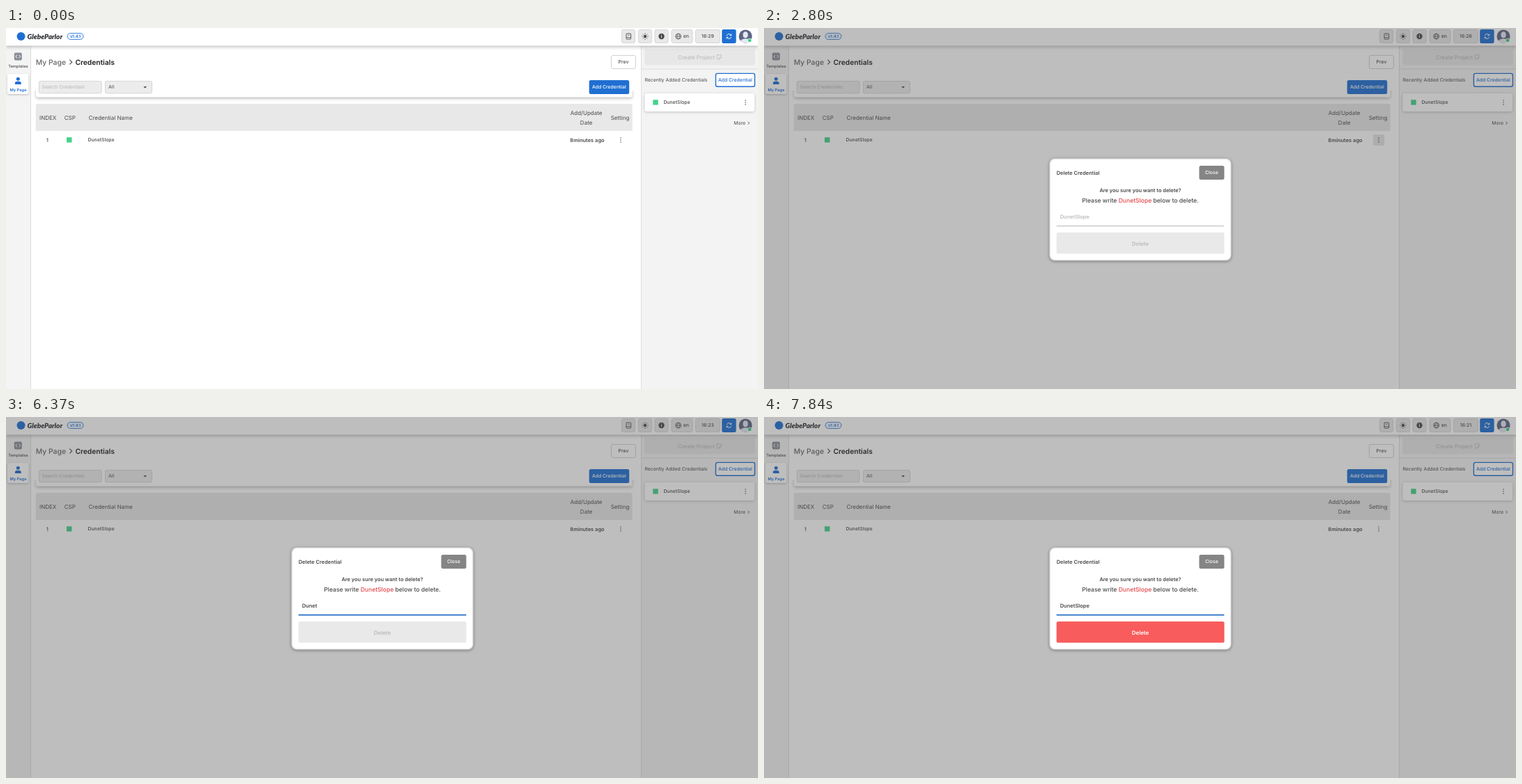
Animation, 1079 px wide and 519 px high, one loop 8 s. Source, as an HTML page with a canvas:

```html
<!DOCTYPE html>
<html lang="en">
<head>
<meta charset="utf-8">
<title>Delete credential</title>
<style>
html, body { margin: 0; width: 100%; height: 100%; overflow: hidden; background: #fff; }
canvas { display: block; width: 1079px; height: 519px; }
</style>
</head>
<body>
<canvas id="stage"></canvas>
<script>
const W = 1079, H = 519, LOOP = 8000;
const STEP = 70, TICK = 1050, FIRST_TICK = 490;
const MENU_OPEN = 2100, MODAL = 2800, FOCUS = 3640;
const KEYS = [4900, 5390, 5530, 5740, 5880, 6580, 6790, 6930, 7070, 7210];
const BRAND = 'GlebeParlor', NAME = 'DunetSlope';
const BLUE = '#1f6fd2', INK = '#4a4a4a', GREEN = '#45d28a';

const canvas = document.getElementById('stage');
const dpr = window.devicePixelRatio || 1;
canvas.width = Math.round(W * dpr);
canvas.height = Math.round(H * dpr);
const c = canvas.getContext('2d');

function box(x, y, w, h, r, fill, stroke, line = 0.8) {
  c.beginPath();
  c.roundRect(x, y, w, h, r);
  if (fill) { c.fillStyle = fill; c.fill(); }
  if (stroke) { c.strokeStyle = stroke; c.lineWidth = line; c.stroke(); }
}

function shadowBox(x, y, w, h, r, fill, color, blur, dy) {
  c.save();
  c.shadowColor = color;
  c.shadowBlur = blur * dpr;
  c.shadowOffsetY = dy * dpr;
  box(x, y, w, h, r, fill);
  c.restore();
}

function disc(x, y, r, fill) {
  c.beginPath();
  c.arc(x, y, r, 0, 7);
  c.fillStyle = fill;
  c.fill();
}

function path(points, color, width) {
  c.beginPath();
  points.forEach(([x, y], i) => i ? c.lineTo(x, y) : c.moveTo(x, y));
  c.strokeStyle = color;
  c.lineWidth = width;
  c.stroke();
}

function arc(x, y, rx, ry, from, to, color, width) {
  c.beginPath();
  c.ellipse(x, y, rx, ry, 0, from, to);
  c.strokeStyle = color;
  c.lineWidth = width;
  c.stroke();
}

// y is the middle of the capital letters
function text(s, x, y, size, color = INK, weight = 400, align = 'left') {
  c.font = `${weight} ${size}px Inter, sans-serif`;
  c.textAlign = align;
  c.fillStyle = color;
  c.fillText(s, x, y + size * 0.364);
  return c.measureText(s).width;
}

const label = (s, x, y, size, color, weight) => text(s, x, y, size, color, weight, 'center');
const chevron = (x, y, r, color, width) =>
  path([[x - r / 2, y - r], [x + r / 2, y], [x - r / 2, y + r]], color, width);
const dots = (x, y) => [-3, 0, 3].forEach(d => disc(x, y + d, 0.8, '#555'));
const mix = (a, b, p) => `rgb(${a.map((v, i) => Math.round(v + (b[i] - v) * p))})`;

function ease(t, start) {
  const x = Math.floor((t - start) / STEP) / 3;
  return x <= 0 ? 0 : x >= 1 ? 1 : 1 - (1 - x) ** 2;
}

function header(t) {
  shadowBox(0, -6, W, 31.5, 0, '#fff', 'rgba(0,0,0,.28)', 5, 1);
  disc(21.5, 12, 6, BLUE);
  c.font = 'italic 900 10px Lato, sans-serif';
  c.textAlign = 'left';
  c.fillStyle = '#2f3136';
  c.fillText(BRAND, 30.5, 15.5);
  box(88, 7.5, 23, 9, 4.5, '#eaf3fd', BLUE);
  label('v1.4.1', 99.5, 12, 5.8, BLUE, 600);

  for (const [x, w] of [[883, 20], [907, 20], [930.5, 20], [954.5, 31], [989, 36]])
    box(x + 0.4, 2.4, w - 0.8, 19, 2.5, '#e8e8e8', '#d0d0d0');

  box(890, 8, 6.6, 8, 0.8, null, INK, 0.9);
  path([[890, 13.7], [896.6, 13.7]], INK, 0.8);
  path([[892, 10.3], [895, 10.3]], INK, 0.7);

  disc(917, 12, 2.2, INK);
  for (let i = 0; i < 8; i++) {
    const a = i * Math.PI / 4, dx = Math.cos(a), dy = Math.sin(a);
    path([[917 + dx * 3.2, 12 + dy * 3.2], [917 + dx * 4.7, 12 + dy * 4.7]], INK, 0.9);
  }

  disc(940.5, 12, 4.2, INK);
  path([[940.5, 11.4], [940.5, 14.2]], '#eee', 1);
  disc(940.5, 9.9, 0.6, '#eee');

  arc(964.7, 12, 3.9, 3.9, 0, 7, INK, 0.8);
  arc(964.7, 12, 1.7, 3.9, 0, 7, INK, 0.7);
  path([[960.8, 12], [968.6, 12]], INK, 0.7);
  text('en', 971.8, 12, 6.86, INK, 500);

  const ticks = t < FIRST_TICK ? 0 : 1 + Math.floor((t - FIRST_TICK) / TICK);
  label('16:' + (29 - ticks), 1007, 12, 6.86, INK, 500);

  box(1027.2, 2, 20.4, 20, 2.5, BLUE);
  arc(1037.4, 12, 3.3, 3.3, Math.PI * 1.08, Math.PI * 1.85, '#fff', 1);
  arc(1037.4, 12, 3.3, 3.3, Math.PI * 0.08, Math.PI * 0.85, '#fff', 1);
  path([[1040.9, 8.4], [1040.6, 10.9], [1038.4, 10.6]], '#fff', 0.9);
  path([[1033.9, 15.6], [1034.2, 13.1], [1036.4, 13.4]], '#fff', 0.9);

  c.save();
  c.beginPath();
  c.arc(1061, 12, 9.5, 0, 7);
  c.clip();
  c.fillStyle = '#5d6585';
  c.fillRect(1050, 0, 22, 24);
  c.fillStyle = '#e6e8f0';
  c.beginPath();
  c.ellipse(1061, 9.8, 3.6, 4.5, 0, 0, 7);
  c.ellipse(1061, 20.5, 7.6, 5.2, 0, 0, 7);
  c.fill();
  c.restore();
  disc(1067, 17.8, 3.1, '#fff');
  disc(1067, 17.8, 2.4, '#35cf85');
}

function sidebar() {
  c.fillStyle = '#f4f4f4';
  c.fillRect(0, 25, 35.5, H);
  c.fillStyle = '#dcdcdc';
  c.fillRect(35, 25, 1, H);
  box(11.8, 35.5, 11, 11, 2, '#8b8f98');
  path([[16, 38.8], [13.8, 41], [16, 43.2]], '#fff', 1);
  path([[18.6, 38.8], [20.8, 41], [18.6, 43.2]], '#fff', 1);
  label('Templates', 17.4, 54.5, 5.75, INK, 500);
  shadowBox(2, 66, 30.5, 29, 2.5, '#fff', 'rgba(0,0,0,.25)', 3, 1);
  disc(17.3, 73.3, 2.5, BLUE);
  box(12.8, 76.7, 9, 4.4, [3.2, 3.2, 0.8, 0.8], BLUE);
  label('My Page', 17.5, 89, 5.75, BLUE, 600);
}

function page(t) {
  text('My Page', 42.7, 49, 10.4, '#666', 500);
  chevron(93, 49, 3.4, '#555', 1.2);
  text('Credentials', 99.5, 49, 10.2, '#1f1f1f', 600);
  box(868.4, 39.4, 35, 19, 2.5, '#fff', '#c4c4c4');
  label('Prev', 886, 49, 6.86, INK, 500);

  c.save();
  c.beginPath();
  c.rect(38, 90, 868, 18);
  c.clip();
  shadowBox(43, 60, 855.5, 39.5, 3, '#fff', 'rgba(0,0,0,.26)', 4, 2);
  c.restore();

  box(47.4, 76.4, 89.7, 17.4, 2, '#ececec', '#cfcfcf');
  text('Search Credentials', 51.5, 85, 6.86, '#b4b4b4');
  box(142.4, 76.4, 67, 17.4, 2, '#ececec', '#cfcfcf');
  text('All', 147, 85, 6.86);
  c.beginPath();
  c.moveTo(197.2, 84);
  c.lineTo(202, 84);
  c.lineTo(199.6, 86.6);
  c.fillStyle = INK;
  c.fill();
  box(836.7, 75, 57.5, 20, 2.5, BLUE);
  label('Add Credential', 865.3, 85, 6.86, '#fff', 500);

  box(42.7, 109, 856, 39, [3, 3, 0, 0], '#e8e8e8');
  text('INDEX', 48, 129, 8);
  text('CSP', 83.7, 129, 8);
  text('Credential Name', 118.5, 129, 8);
  label('Add/Update', 832.6, 122, 8);
  label('Date', 832.6, 135.7, 8);
  label('Setting', 881, 129, 8);

  label('1', 59.2, 161, 7.5, INK, 500);
  box(87, 157.2, 7.4, 7.4, 0, GREEN);
  text(NAME, 117.5, 160.3, 6.86, INK, 500);
  label('8minutes ago', 834, 161, 7.5, INK, 600);
  if (t >= 1750 && t < MODAL + STEP) box(873.8, 153, 16.4, 16, 2, '#e5e5e5');
  dots(882, 161);
}

function menu(t) {
  const half = t < 2590 ? 0.5 : 1;
  const onDelete = t >= 2520 ? half : 0;
  const onDetails = t >= 2240 ? 1 - onDelete : 0;
  const shade = p => mix([242, 242, 242], [217, 217, 217], p);
  box(835.4, 171.4, 55, 26.8, 2.5, '#f2f2f2', '#c8c8c8');
  box(837, 173, 52.4, 11, 2, shade(onDetails));
  box(837, 185.3, 52.4, 11.3, 2, shade(onDelete));
  label('Details', 863, 178.5, 6.86, '#666');
  label('Delete', 863, 191, 6.86, '#666');
}

function panel() {
  c.fillStyle = '#f3f3f3';
  c.fillRect(911, 25, 168, H);
  c.fillStyle = '#dedede';
  c.fillRect(911, 25, 1, H);
  c.fillRect(912, 58.5, 167, 1);
  box(916.3, 30, 158.7, 23.5, 2.5, '#e7e7e7');
  label('Create Project', 990.5, 41.8, 7.75, '#bcbcbc', 500);
  path([[1023.6, 45], [1020.3, 45], [1020.3, 38.6], [1026.2, 38.6], [1026.2, 42.4],
    [1023.6, 45], [1023.6, 42.4], [1026.2, 42.4]], '#bcbcbc', 0.8);
  text('Recently Added Credentials', 916.4, 75, 6.86);
  box(1018.4, 65.4, 56, 18.8, 2.5, '#fff', BLUE, 1.4);
  label('Add Credential', 1046.3, 75, 6.86, BLUE, 500);
  shadowBox(916.5, 94, 157.5, 26, 3, '#fff', 'rgba(0,0,0,.2)', 4, 1);
  box(928.3, 103.2, 7.4, 7.4, 0, GREEN);
  text(NAME, 943.4, 107, 6.86, INK, 500);
  dots(1061, 107);
  text('More', 1044.3, 136.7, 6.86);
  chevron(1065.5, 136.7, 2, INK, 0.9);
}

function modal(t) {
  const typed = KEYS.filter(k => t >= k).length;
  const done = typed === NAME.length;
  c.fillStyle = 'rgba(70,70,70,.35)';
  c.fillRect(0, 0, W, H);
  shadowBox(409.5, 187.5, 261, 147, 8, '#e4e4e4', 'rgba(0,0,0,.4)', 4, 1);
  box(411, 189, 258, 144, 7, '#fff');

  text('Delete Credential', 419.7, 208, 7.43, INK, 600);
  box(624.4, 198, 36, 20, 2.5, '#858585');
  label('Close', 642.4, 208, 6.86, '#fff', 500);
  label('Are you sure you want to delete?', 540, 233.5, 7.43, INK, 600);

  const parts = [['Please write ', INK], [NAME, '#e5484d'], [' below to delete.', INK]];
  c.font = '500 8.57px Inter, sans-serif';
  let x = 540 - parts.reduce((sum, [s]) => sum + c.measureText(s).width, 0) / 2;
  for (const [s, color] of parts) x += text(s, x, 247.5, 8.57, color, 500);

  const value = NAME.slice(0, typed);
  const width = text(value || NAME, 424.7, 271, 7.5, value ? INK : '#bdbdbd', 600);
  const lastInput = typed ? KEYS[typed - 1] : FOCUS;
  if (t >= FOCUS && (t - lastInput) % TICK < 490) {
    c.fillStyle = '#333';
    c.fillRect(424.7 + (value ? width - 0.3 : 0), 265.5, 0.8, 10.5);
  }
  c.fillStyle = mix([210, 210, 210], [42, 112, 200], ease(t, FOCUS));
  c.fillRect(419.7, 283.7, 240.6, 1.8);

  const p = done ? ease(t, KEYS[typed - 1]) : 0;
  box(419.7, 294, 240.8, 30.5, 2.5, mix([233, 233, 233], [248, 92, 92], p));
  label('Delete', 540, 309.8, 7.9, mix([188, 188, 188], [255, 255, 255], p), 600);
}

function draw(t) {
  c.setTransform(dpr, 0, 0, dpr, 0, 0);
  c.textRendering = 'geometricPrecision';
  c.fillStyle = '#fff';
  c.fillRect(0, 0, W, H);
  sidebar();
  page(t);
  panel();
  header(t);
  if (t >= MODAL) modal(t);
  else if (t >= MENU_OPEN) menu(t);
}

const start = performance.now();
function loop() {
  draw((performance.now() - start) % LOOP);
  requestAnimationFrame(loop);
}
loop();
</script>
</body>
</html>
```
